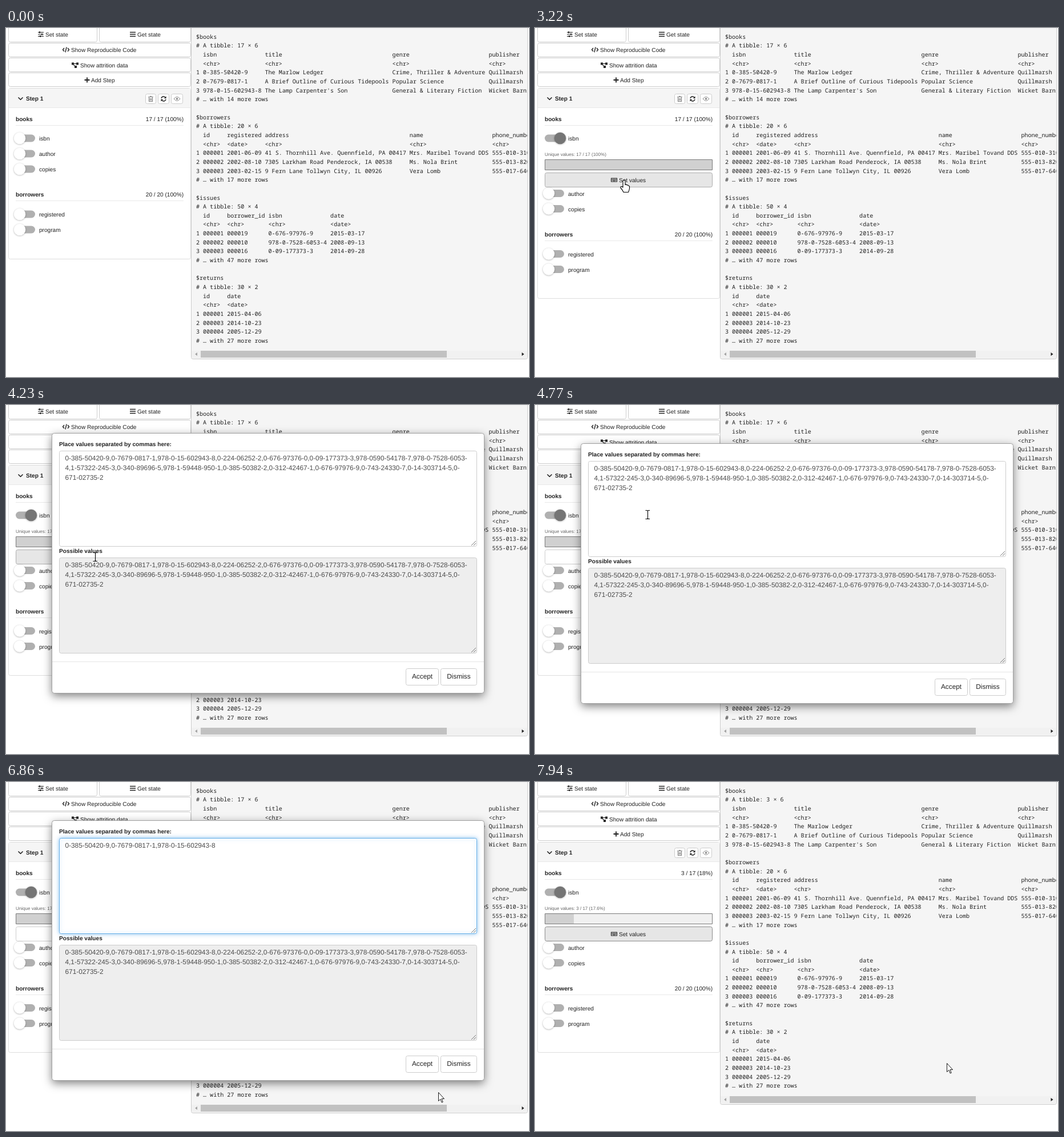
Recreate the animation shown at these times as an HTML page with a canvas. Size 916 by 611 pixels, loop 8 s.

```html
<!DOCTYPE html>
<html lang="en">
<head>
<meta charset="utf-8">
<title>Cohort filter</title>
<style>
html, body { margin: 0; width: 100%; height: 100%; overflow: hidden; background: #fff; }
canvas { display: block; width: 916px; height: 611px; }
</style>
</head>
<body>
<canvas id="stage" width="916" height="611"></canvas>
<script>
const LOOP = 8000;
const SANS = '"Liberation Sans", Arial, sans-serif';
const MONO = '"Noto Sans Mono", "DejaVu Sans Mono", monospace';
const INK = '#222';
const stage = document.getElementById('stage').getContext('2d');
const layer = Object.assign(document.createElement('canvas'), { width: 916, height: 611 }).getContext('2d');
let c = stage;

// Bursts of change: start, end, number of steps
const bursts = [[440, 1060, 9], [1230, 1370, 3], [1520, 1690, 3], [2460, 3220, 11], [3920, 4690, 11],
  [4770, 4920, 3], [5320, 5620, 5], [5790, 6250, 7], [6480, 7020, 8], [7480, 7710, 4], [7880, 7940, 2]];

function snap(t) {
  let s = 0;
  for (const [a, b, n] of bursts) {
    if (t < a) break;
    const step = (b - a) / (n - 1);
    s = a + Math.min(n - 1, Math.floor((t - a + 20) / step)) * step;
  }
  return s;
}

// Eased value between keys [time, ...values]
function track(t, keys) {
  let i = 0;
  while (i < keys.length - 1 && t >= keys[i + 1][0]) i++;
  const a = keys[i], b = keys[Math.min(i + 1, keys.length - 1)];
  const u = a === b ? 0 : Math.max(0, (t - a[0]) / (b[0] - a[0]));
  const e = u * u * (3 - 2 * u);
  return a.slice(1).map((v, k) => v + (b[k + 1] - v) * e);
}

const mousePath = [[440, 713, 578], [1060, 38, 210], [1230, 38, 210], [1370, 33, 203], [1520, 33, 203],
  [1690, 23, 192], [2600, 23, 192], [3220, 156, 266], [4450, 156, 266], [4690, 197, 192],
  [4770, 197, 192], [4920, 185, 164], [5320, 180, 155], [5620, 53, 63], [5780, 60, 71],
  [5866, 101, 107], [6096, 198, 205], [6480, 198, 205], [6866, 757, 544], [7020, 721, 493]];

const within = (p, x0, y0, x1, y1) => p[0] >= x0 && p[0] <= x1 && p[1] >= y0 && p[1] <= y1;

// ---- drawing helpers ----
function box(x, y, w, h, r, fill, stroke) {
  c.beginPath();
  c.roundRect(x + .5, y + .5, w, h, r);
  if (fill) { c.fillStyle = fill; c.fill(); }
  if (stroke) { c.strokeStyle = stroke; c.lineWidth = 1; c.stroke(); }
}
function rect(x, y, w, h, fill) { c.fillStyle = fill; c.fillRect(x, y, w, h); }
function label(s, x, y, { size = 10.1, color = INK, bold = false, align = 'left' } = {}) {
  c.font = `${bold ? 'bold ' : ''}${size}px ${SANS}`;
  c.textRendering = 'geometricPrecision';
  c.textAlign = align;
  c.fillStyle = color;
  c.fillText(s, x, y);
}
function shape(d, x, y, { fill, stroke, width = 1 }) {
  const p = new Path2D(d);
  c.save();
  c.translate(x, y);
  if (fill) { c.fillStyle = fill; c.fill(p); }
  if (stroke) { c.strokeStyle = stroke; c.lineWidth = width; c.lineJoin = 'round'; c.stroke(p); }
  c.restore();
}
function shadow(color, blur, dy) { c.shadowColor = color; c.shadowBlur = blur; c.shadowOffsetY = dy; }
function noShadow() { shadow('transparent', 0, 0); }

const buttonStyles = {
  plain: ['#fff', '#ccc'], hover: ['#e6e6e6', '#adadad'],
  focus: ['#e6e6e6', '#8c8c8c'], press: ['#d4d4d4', '#8c8c8c']
};
function button(x, y, w, h, mode = 'plain') { box(x, y, w, h, 3, ...buttonStyles[mode]); }

// ---- icons ----
function icon(name, x, y) {
  const line = (d, width = 1.4, stroke = INK) => shape(d, x, y, { stroke, width });
  if (name === 'sliders') {
    line('M-5-3.5H5M-5 0H5M-5 3.5H5', 1.2);
    line('M-2-5V-2M2-1.5V1.5M-1 2V5', 1.8);
  } else if (name === 'bars') line('M-5-3.5H5M-5 0H5M-5 3.5H5', 1.7);
  else if (name === 'code') line('M-3-3L-5.5 0L-3 3M3-3L5.5 0L3 3M1-4.5L-1 4.5');
  else if (name === 'diagram') {
    shape('M-6-4.5h4v4h-4zM2-4.5h4v4h-4zM-1 1h4v4h-4z', x, y, { fill: INK });
    line('M-3-2.5H3M-3-1L1 3', 1.1);
  } else if (name === 'plus') line('M-4.5 0H4.5M0-4.5V4.5', 1.8);
  else if (name === 'keyboard') {
    line('M-5-3H5V3H-5Z', 1.1);
    line('M-4-1.2H4M-4 .4H4M-2.5 2H2.5', .9);
  } else if (name === 'trash') {
    line('M-3-2.5V4.5H3V-2.5M-4.3-3.2H4.3M-1.3-4.5H1.3M-1-1V3M1-1V3', 1.1, '#777');
  } else if (name === 'refresh') {
    line('M-4-.8A4 4 0 0 1 3-2.6M4 .8A4 4 0 0 1-3 2.6', 1.5);
    shape('M4.6-4.6V-.8H.8ZM-4.6 4.6V.8H-.8Z', x, y, { fill: INK });
  } else if (name === 'eye') {
    line('M-5.5 0Q0-7 5.5 0Q0 7-5.5 0Z', 1, '#888');
    shape('M-1.8 0a1.8 1.8 0 1 0 3.6 0a1.8 1.8 0 1 0-3.6 0', x, y, { fill: '#888' });
  }
}

// ---- left panel ----
function toggle(y, name, on = 0) {
  c.beginPath();
  c.roundRect(17, y - 6.5, 34, 13, 6.5);
  c.fillStyle = '#b0b0b0';
  c.fill();
  shadow('rgba(0,0,0,.3)', 3, .7);
  c.beginPath();
  c.arc(24 + 20 * on, y, 10.3, 0, 7);
  c.fillStyle = on > .4 ? '#757575' : '#fff';
  c.fill();
  noShadow();
  label(name, 58, Math.round(y + 4));
}
function section(name, y, count) {
  label(name, 17, y, { bold: true });
  label(count, 311, y, { align: 'right' });
  rect(17, y + 7, 294, 1, '#e8e8e8');
}
function leftPanel(s) {
  button(4, -4, 155, 28);
  button(163, -4, 160, 28);
  [26, 52, 78].forEach(y => button(4, y, 319, 24));
  [['sliders', 61, 11, 'Set state', 69], ['bars', 222, 11, 'Get state', 230],
    ['code', 105, 38, 'Show Reproducible Code', 114], ['diagram', 121, 65, 'Show attrition data', 130],
    ['plus', 142, 91, 'Add Step', 149]].forEach(([name, x, y, text, tx]) => {
    icon(name, x, y);
    label(text, tx, y + 4);
  });

  const open = s >= 2610, done = s >= 7880, drop = open ? 69.5 : 0;
  box(4, 105, 319, 299 + Math.floor(drop), 3, '#fff', '#ddd');
  rect(5, 106, 318, 33, '#f5f5f5');
  rect(5, 139, 318, 1, '#e8e8e8');
  shape('M-4-2L0 2L4-2', 25.5, 123.5, { stroke: INK, width: 1.6 });
  label('Step 1', 35, 127, { bold: true });
  [['trash', 244, 18], ['refresh', 266, 19], ['eye', 289, 20]].forEach(([name, x, w]) => {
    button(x, 115, w, 17);
    icon(name, x + w / 2 + .5, 124);
  });

  section('books', 163, done ? '3 / 17 (18%)' : '17 / 17 (100%)');
  toggle(193, 'isbn', s < 2460 ? 0 : s < 2530 ? .5 : 1);
  if (open) {
    label(`Unique values: ${done ? '3 / 17 (17.6%)' : '17 / 17 (100%)'}`, 17, 224, { size: 8.03, color: '#666' });
    box(17, 230, 293, 18, 0, '#f0f0f0', '#7a7a7a');
    rect(18, 231, done ? 50 : 292, 17, '#d0d0d0');
    const over = within(track(s, mousePath), 17, 253, 310, 278);
    const mode = s >= 7700 ? 'focus' : s >= 3920 && s < 3990 ? 'press' : s < 4300 && over ? 'hover' : 'plain';
    button(17, 253, 293, 25, mode);
    icon('keyboard', 138.5, 266);
    label('Set values', 147, 270);
  }
  toggle(220 + drop, 'author');
  toggle(247 + drop, 'copies');
  section('borrowers', Math.floor(295.5 + drop), '20 / 20 (100%)');
  toggle(326 + drop, 'registered');
  toggle(353 + drop, 'program');
}

// ---- printed tables ----
const tables = [
  { name: 'books', size: '17 × 6', more: 14, cols: [2, 20, 57, 85], rows: [
    'isbn|title|genre|publisher', '<chr>|<chr>|<chr>|<chr>',
    '0-385-50420-9|The Marlow Ledger|Crime, Thriller & Adventure|Quillmarsh',
    '0-7679-0817-1|A Brief Outline of Curious Tidepools|Popular Science|Quillmarsh',
    "978-0-15-602943-8|The Lamp Carpenter's Son|General & Literary Fiction|Wicket Barns"] },
  { name: 'borrowers', size: '20 × 6', more: 17, cols: [2, 9, 20, 62, 86], rows: [
    'id|registered|address|name|phone_number', '<chr>|<date>|<chr>|<chr>|<chr>',
    '000001|2001-06-09|41 S. Thornhill Ave. Quennfield, PA 00417|Mrs. Maribel Tovand DDS|555-010-3100',
    '000002|2002-08-10|7305 Larkham Road Penderock, IA 00538|Ms. Nola Brint|555-013-8200',
    '000003|2003-02-15|9 Fern Lane Tollwyn City, IL 00926|Vera Lomb|555-017-6400'] },
  { name: 'issues', size: '50 × 4', more: 47, cols: [2, 9, 21, 39], rows: [
    'id|borrower_id|isbn|date', '<chr>|<chr>|<chr>|<date>',
    '000001|000019|0-676-97976-9|2015-03-17', '000002|000010|978-0-7528-6053-4|2008-09-13',
    '000003|000016|0-09-177373-3|2014-09-28'] },
  { name: 'returns', size: '30 × 2', more: 27, cols: [2, 9], rows: [
    'id|date', '<chr>|<date>', '000001|2015-04-06', '000003|2014-10-23', '000004|2005-12-29'] }
];

function printout(filtered) {
  const lines = [];
  for (const { name, size, more, cols, rows } of tables) {
    const cut = filtered && name === 'books';
    lines.push('$' + name, `# A tibble: ${cut ? '3 × 6' : size}`);
    rows.forEach((row, i) => lines.push(row.split('|').reduce(
      (text, cell, k) => text.padEnd(cols[k]) + cell, i > 1 ? String(i - 1) : '')));
    if (!cut) lines.push(`# … with ${more} more rows`);
    lines.push('');
  }
  return lines;
}
const fullLines = printout(false), shortLines = printout(true);

function rightPanel(s) {
  const filtered = s >= 7930, end = filtered ? 564 : 579;
  box(324, -6, 589, end + 6, 3, '#f5f5f5', '#ccc');
  c.save();
  c.beginPath();
  c.rect(325, 0, 588, end);
  c.clip();
  c.font = `10.06px ${MONO}`;
  c.textRendering = 'geometricPrecision';
  c.textAlign = 'left';
  c.fillStyle = INK;
  (filtered ? shortLines : fullLines).forEach((text, i) => c.fillText(text, 333, Math.round(18.8 + 15.65 * i)));
  c.restore();
  rect(325, end - 14, 588, 13, '#f1f1f1');
  rect(341, end - 14, 431, 12, '#c1c1c1');
  shape('M2-3V3L-2 0Z', 333, end - 8, { fill: '#a3a3a3' });
  shape('M-2-3V3L2 0Z', 905.5, end - 8, { fill: INK });
}

// ---- dialog ----
const values = [
  '0-385-50420-9,0-7679-0817-1,978-0-15-602943-8,0-224-06252-2,0-676-97376-0,0-09-177373-3,978-0590-54178-7,978-0-7528-6053-',
  '4,1-57322-245-3,0-340-89696-5,978-1-59448-950-1,0-385-50382-2,0-312-42467-1,0-676-97976-9,0-743-24330-7,0-14-303714-5,0-',
  '671-02735-2'];
const pasted = [values[0].slice(0, 45)];
const PASTE = 6170;
const field = { size: 11.83, color: '#4c4c4c' };

function textarea(y, lines, fill, focus) {
  if (focus) shadow('rgba(102,175,233,.7)', 7, 0);
  box(93, y, 731, 167, 3, fill, focus ? '#66afe9' : '#ccc');
  noShadow();
  shape('M-8 0L0-8M-4 0L0-4', 823, y + 166, { stroke: '#777' });
  lines.forEach((text, i) => label(text, 103.5, y + 17 + 17 * i, field));
}

function selection(mouse) {
  const first = Math.max(0, Math.min(2, Math.floor((mouse[1] - 103) / 17)));
  values.forEach((text, i) => {
    if (i < first) return;
    c.font = `${field.size}px ${SANS}`;
    const right = 103.5 + c.measureText(text).width + (i === 0 ? 2 : 0);
    const left = i === first && mouse[1] >= 112 ? Math.min(right, Math.max(103, mouse[0])) : 103;
    c.save();
    c.beginPath();
    c.rect(left, 103 + 17 * i, right - left, 17.5);
    c.clip();
    rect(left, 103 + 17 * i, right - left, 18, '#3390ff');
    label(text, 103.5, 115 + 17 * i, { ...field, color: '#fff' });
    c.strokeStyle = '#fff';
    c.lineWidth = .5;
    c.strokeText(text, 103.5, 115 + 17 * i);
    c.restore();
  });
}

function dialog(s, mouse) {
  if (s < 4220 || s >= 7700) return;
  const [dy, alpha] = track(s, [[4220, -18, 1], [4300, -5, 1], [4455, 0, 1], [7480, 0, 1],
    [7556, -11, .88], [7633, -22, .35]]);
  c = layer;
  c.clearRect(0, 0, 916, 611);
  c.save();
  c.translate(0, Math.round(dy));
  shadow('rgba(0,0,0,.5)', 16, 5);
  box(80, 67, 757, 455, 4, '#fff');
  noShadow();
  box(80, 67, 757, 455, 4, null, '#a0a0a0');
  label('Place values separated by commas here:', 93, 90, { bold: true });
  textarea(98, s < PASTE ? values : pasted, '#fff', s >= 5320 && s < 7480);
  if (s >= 5390 && s < PASTE) selection(s < 5620 ? mouse : [53, 63]);
  if (s >= PASTE && s < 7480 && Math.floor((s - PASTE) / 530) % 2 === 0) rect(367, 105, 1, 14, INK);
  label('Possible values', 93, 277, { bold: true });
  textarea(285, values, '#eee', false);
  rect(81, 467, 756, 1, '#e5e5e5');
  const accept = s >= 7480 && s < 7550 ? 'press' : within(mouse, 700, 479, 758, 508) ? 'hover' : 'plain';
  button(700, 479, 57, 29, accept);
  button(761, 479, 63, 29);
  label('Accept', 729, 497, { ...field, color: INK, align: 'center' });
  label('Dismiss', 793, 497, { ...field, color: INK, align: 'center' });
  c.restore();
  c = stage;
  c.globalAlpha = alpha;
  c.drawImage(layer.canvas, 0, 0);
  c.globalAlpha = 1;
}

// ---- mouse ----
const cursors = {
  arrow: 'M.5-.5V14.5L3.9 11.3L6.2 17L8.2 16.2L6 10.6H10.5Z',
  hand: 'M-2 12V2Q-2 .5 0 .5T2 2V8.5Q4 7 5 9Q7 8.5 7.5 10Q9.5 10 9.5 12V15Q9 18 7.5 21.5H-1Q-3 17-6 14Q-6.5 11-4 11.5L-2 13Z',
  beam: 'M-3.5-7.5H-1Q.5-7.5.5-6Q.5-7.5 2-7.5H4M.5-6V6M-3.5 7.5H-1Q.5 7.5.5 6Q.5 7.5 2 7.5H4'
};

function cursorKind(s, p) {
  if (s >= 4220 && s < 7700) {
    if (within(p, 93, 98, 825, 453) || (s >= 5320 && s < 5860)) return 'beam';
    return within(p, 700, 479, 825, 508) ? 'hand' : 'arrow';
  }
  if (s >= 7700) return 'arrow';
  const onSwitch = within(p, 13, 183, 51, 202);
  const onButton = s >= 2610 && within(p, 17, 253, 310, 278);
  return onSwitch || onButton ? 'hand' : 'arrow';
}

function drawCursor(s, p) {
  if (s < 440) return;
  const kind = cursorKind(s, p);
  shape(cursors[kind], Math.round(p[0]), Math.round(p[1]),
    { fill: kind === 'beam' ? null : '#fff', stroke: '#000', width: kind === 'arrow' ? .9 : 1.1 });
}

function frame(now) {
  const s = snap(now % LOOP);
  const mouse = track(s, mousePath);
  rect(0, 0, 916, 611, '#fff');
  leftPanel(s);
  rightPanel(s);
  dialog(s, mouse);
  drawCursor(s, mouse);
  requestAnimationFrame(frame);
}
requestAnimationFrame(frame);
</script>
</body>
</html>
```
